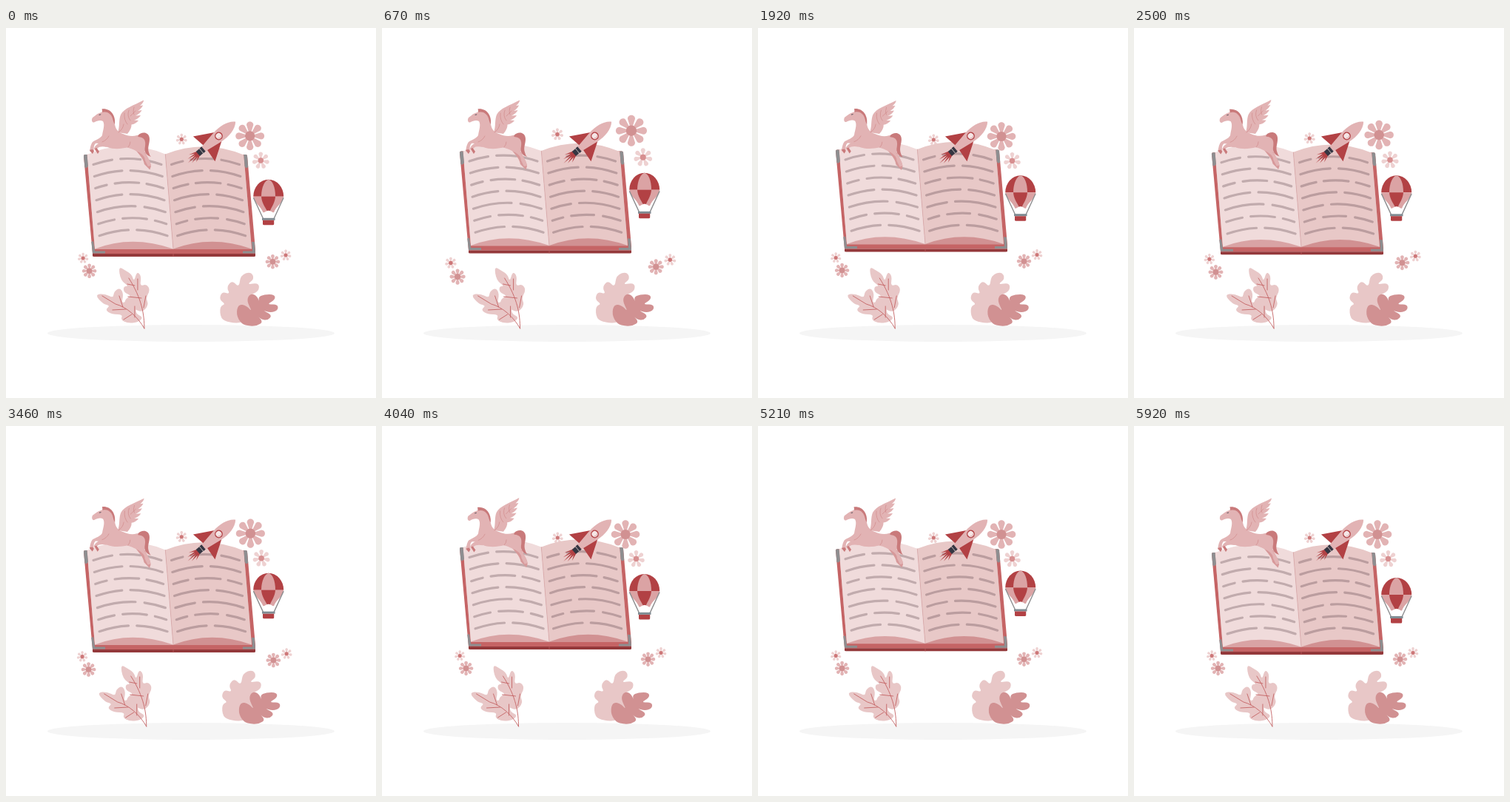
Animation of 500x500 px, one loop 5960 ms. Source, as an HTML page:

```html
<!DOCTYPE html>
<html lang="en">
<head>
<meta charset="utf-8">
<title>Open book</title>
<style>
  html, body { margin: 0; width: 100%; height: 100%; overflow: hidden; background: #fff; }
  svg { display: block; width: 100vw; height: 100vh; }
</style>
</head>
<body>
<svg id="stage" viewBox="0 0 500 500"></svg>
<script>
const RED = '#b24144', COVER = '#c56465', DARK = '#94393b', ROSE = '#e2b3b4', MID = '#d19192',
      DEEP = '#c97a7b', PALE = '#eed1d1', LEAF = '#e8c7c7', GREY = '#8e8e90', INK = '#353642';

const path = (d, fill) => `<path d="${d}" fill="${fill}"/>`;
const line = (d, color, width, extra = '') =>
  `<path d="${d}" fill="none" stroke="${color}" stroke-width="${width}" stroke-linecap="round" ${extra}/>`;
const circle = (x, y, r, fill) => `<circle cx="${x}" cy="${y}" r="${r}" fill="${fill}"/>`;
const group = (id, ...parts) => `<g id="${id}">${parts.join('')}</g>`;

// Closed shape, smoothed through the midpoints of its corners
function blob(text, fill) {
  const p = text.split(' ').map(s => s.split(',').map(Number));
  const mid = i => {
    const a = p[i % p.length], b = p[(i + 1) % p.length];
    return `${(a[0] + b[0]) / 2} ${(a[1] + b[1]) / 2}`;
  };
  return path('M' + mid(p.length - 1) + p.map((c, i) => `Q${c} ${mid(i)}`).join('') + 'Z', fill);
}

function flower(x, y, r, n, petal, heart, core) {
  const w = r * 0.24;
  const d = `M0 0L${-w} ${-r * 0.76}C${-w} ${-r * 1.08} ${w} ${-r * 1.08} ${w} ${-r * 0.76}Z`;
  let out = '';
  for (let i = 0; i < n; i++)
    out += `<path d="${d}" fill="${petal}" transform="rotate(${i * 360 / n})"/>`;
  return `<g transform="translate(${x} ${y})">${out}${circle(0, 0, core, heart)}</g>`;
}

// Seven dashed text rows, each following the bend of the page
function rows(x, color, dashes) {
  return dashes.map((dash, i) => {
    const x0 = x + 1.35 * i, y0 = 184.5 + 16.05 * i;
    return line(`M${x0} ${y0}Q${x0 + 46} ${y0 - 16} ${x0 + 92} ${y0}`, color, 3.2,
      `pathLength="100" stroke-dasharray="${dash} 200"`);
  }).join('');
}

const shadow = '<ellipse cx="250" cy="412.5" rx="194" ry="11.5" fill="#f5f5f5"/>';

const flowers = group('flowers',
  flower(329, 146.5, 19.3, 8, ROSE, MID, 6.6),
  flower(343.5, 179.5, 11.5, 7, PALE, '#d78f90', 3.7),
  flower(237.3, 151, 7.5, 7, PALE, '#cd7778', 2.5),
  flower(105.2, 310.4, 7.2, 7, PALE, '#cd7778', 2.5),
  flower(113.6, 327.5, 9.7, 8, ROSE, MID, 3.8),
  flower(359.5, 315.2, 9.7, 8, ROSE, MID, 3.8),
  flower(377, 306.5, 7.4, 7, PALE, '#cd7778', 2.5));

const book = group('book',
  path('M105 173Q105 171 107 171H324Q325.8 171 326 173L337 300V305H117Z', COVER),
  path('M117 305H337V308Q337 309 335 309H119Q117 309 117 308Z', DARK),
  path('M109.5 172L120 299H226L215.5 172Z', '#d9a3a4'),
  path('M215.5 172L226 299H332L321.3 172Z', MID),
  path('M109.5 171Q163 149 215.3 170.5L226 298.5Q170 279 120 298.5Z', '#f0dbdb'),
  path('M215.3 170.5Q268 149.5 321.3 171.5L332 298.5Q278 279 226 298.5Z', '#e8c8c7'),
  line('M215.3 170.5L226 298.5', '#d5a5a6', 0.7),
  line('M226 305V309', COVER, 0.6),
  rows(118, '#c1abad', ['28 12 29 11 20', '41 12 47', '17 12 35 11 25', '38 12 50',
    '56 13 31', '24 12 35 12 17', '43 12 45']),
  rows(223.5, '#bb9d9f', ['17 12 33 11 27', '44 12 44', '22 11 36 11 20', '50 12 38',
    '29 12 59', '16 12 33 13 26', '43 12 45']),
  path('M105 173Q105 171 107 171H109.5L111 187L108 189.5L106.4 188Z', GREY),
  path('M321.3 171H324Q325.8 171 326 173L327.2 188L324.6 189.5L322.6 187Z', GREY),
  path('M115.3 289L118 288L120.2 301.5H134V304.5H117Z', GREY),
  path('M332 289L335.8 289L337 304.5H320V301.5H333Z', GREY));

const pegasus = group('pegasus',
  path('M135 154C127 154 121 157 119 163L124 170L126 167L123 163C126 160 131 160 136 161Z', ROSE),
  path('M120 163L124 170L126 167L122.5 162Z', DEEP),
  path('M168 156L181 172Q186 178 187 184L194.5 191.5L196 187C196 181 191 175 188 168Z', '#d7999a'),
  path('M131 110L129 114C124 115 120 119 117 121C115 124 116 128 119 127.5C123 125 128 124 131 126' +
    'C134 131 131 138 130 145C127 150 121 151 117 154C114 158 114 163 113 166L117 170L119 166' +
    'C118 162 119 158 121 156C127 155 131 159 137 161C146 164.5 157 163 164 161.5C171 163 175 166 180 168' +
    'C186 172 188 175 188 179L192 187L196 186C195.5 180 191 174 187 168C190 162 190 154 186 149' +
    'C183 145.5 180 144.5 177 145C171 147 164 146 158 143C152 141 148 137 147 130C147 120 141 111 131 110Z', ROSE),
  path('M178.5 145C183 139.5 194 140 194 150C194 157 191 161 193 168Q194 172 196 174' +
    'C189 172 186.5 167 188 160C189 153 187.5 147.5 178.5 147Z', DEEP),
  path('M129.5 109.5C140 108 148.5 117 147 130C144 126 145 121 141 117C138 113.5 134 113 130.5 114Z', DEEP),
  path('M113 165L117 170L119 166.5L117 164Z', DEEP),
  line('M126 117.4L127.8 117', INK, 0.8),
  path('M151 141C154 134 152 124 155 117C160 108 172 105 186 97.5Q186 101 181 105L185 104.5Q183 109 178 112' +
    'L183.5 111Q181 116 175 118.5L182 118Q179 123 173 124.5L179 125Q175 130 169.5 130.5Q170 136 164 143Z', ROSE),
  line('M160 115Q159 124 164 130M166 111Q163 119 168 125M173 107Q171 113 173 117M168 119L175 112', DEEP, 0.5),
  line('M152 141Q158 137 159 130M139 146Q136 152 130 154M165 161Q168 158 168 154', DEEP, 0.5));

const rocket = `<g transform="translate(287.5 146) rotate(-40.5)">` +
  group('flame',
    path('M-36 -3.5L-47 -7L-40 -3L-52 -3.6L-41 -1L-55 0.6L-41 1L-51 4L-40 3L-46 7L-36 3.5Z', RED)) +
  path('M-1 -7.5L-26.7 -22L-24 -4ZM-1 7.5L-26 22.7L-24 4Z', RED) +
  path('M29.8 0C23 -7.5 10 -9.5 -2 -8L-27 -4V4L-2 8C10 9.5 23 7.5 29.8 0Z', ROSE) +
  path('M-27 -4.2H-30.5V4.2H-27ZM-31.3 -4H-37V4H-31.3Z', INK) +
  line('M-30.9 -3.8V3.8', GREY, 0.8) +
  circle(0, 0, 5.4, RED) + circle(0, 0, 4, '#f5e6e6') +
  line('M-2.5 1.8A3 3 0 0 0 2.5 1.8', '#d9a3a4', 0.8) + '</g>';

const balloon = group('balloon',
  path('M334.2 229A20.5 23 0 0 1 375.2 229Z', RED),
  path('M334.2 229H375.2C374 238 365 242 362 250.5H347.5C344 242 336 238 334.2 229Z', '#dba3a4'),
  path('M345 229C345 216 350 207 354.7 206C360 207 364 216 364 229Z', '#dba3a4'),
  path('M345 229H364C363.5 237 359 243 357 248H352.5C350 243 345.5 237 345 229Z', RED),
  path('M347.5 251.5Q354.7 244.5 362 251.5L361 258H348.5Z', '#fff'),
  line('M334.6 231L347.6 259M374.9 231L362 259', GREY, 1.4),
  path('M346 258H363.5V261H346Z', '#7f8b92'),
  path('M347 261H362.2V266Q362.2 267.5 360.5 267.5H348.7Q347 267.5 347 266Z', RED));

const plants = group('plants',
  blob('152,322 162,328 170,333 173,343 177,329 183,335 181,349 190,346 195,354 189,365 193,374 184,385 171,378 160,376 161,366 170,362 159,357 159,349 166,349 155,341', LEAF),
  blob('120,360 134,359 145,365 146,356 154,351 159,359 156,373 166,367 176,374 175,386 186,391 178,398 164,399 155,394 158,387 143,387 134,381 141,375 131,373', LEAF),
  line('M187 406C187 388 184 366 166 338M186 378L189 362M183 365L165 363M178 354L178 339M174 348L164 346', COVER, 0.9),
  line('M187 406C178 390 163 377 148 373L130 362M170 387L159 394M162 380L144 381M158 377L153 362M174 391L174 376', COVER, 0.9),
  blob('302,398 290,393 289,376 297,373 288,367 292,356 303,360 298,350 306,341 315,351 317,334 331,329 336,339 325,347 342,344 342,356 327,362 340,380 320,399', LEAF),
  blob('330,403 318,400 311,387 314,373 325,375 333,384 325,368 330,359 339,361 345,376 340,364 349,360 363,360 364,367 352,374 367,373 368,381 358,385 346,381 360,388 354,395 345,394 337,386 348,397 340,402', MID));

document.getElementById('stage').innerHTML = shadow + plants + flowers + book + balloon + pegasus + rocket;

const move = (id, transform) => document.getElementById(id).setAttribute('transform', transform);

const LOOP = 5960, LEAD = 45;
const triangle = (t, period) => 1 - Math.abs(1 - 2 * (t % period) / period);
const sway = t => triangle(t + 375, 1500) * 2 - 1;

// Linear keys, ten equal steps over six seconds
function keys(t, values) {
  const p = (t % 6000) / 600, i = Math.floor(p);
  return values[i] + (values[i + 1] - values[i]) * (p - i);
}

const BEAT = [1, 1.1, 1.05, 1, 1, 1.1, 1, 1, 1, 1, 1];
const SHAKE = [0, -1, 2, -4, 4, -4, 4, -4, 2, -1, 0];

function draw() {
  const t = performance.now() % LOOP + LEAD;
  move('book', `translate(0 ${0.3 - 10 * triangle(t, 3000)})`);
  move('balloon', `translate(0 ${-0.6 - 10 * triangle(t, 1500)})`);
  move('flowers', `translate(241 232) scale(${keys(t, BEAT)}) translate(-241 -232)`);
  move('plants', `translate(${keys(t, SHAKE)} 0)`);
  move('pegasus', `rotate(${sway(t)} 155 144)`);
  move('flame', `translate(-36 0) scale(${1 + 0.08 * triangle(t, 3000)}) translate(36 0)`);
  requestAnimationFrame(draw);
}
draw();
</script>
</body>
</html>
```
